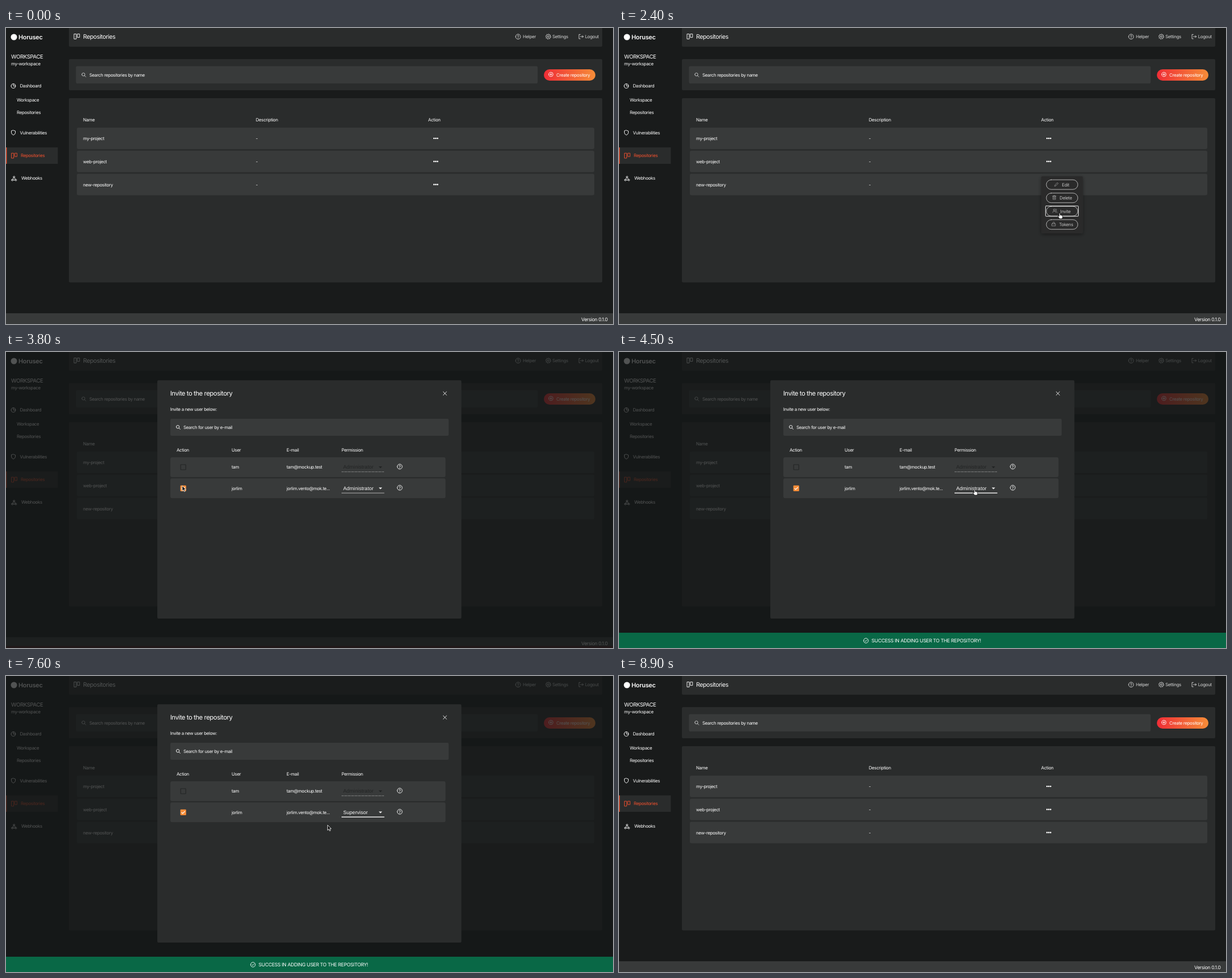
An HTML page that plays this animation: 1071 by 523 pixels, repeating every 9.4 s.

```html
<!DOCTYPE html>
<html lang="en">
<head>
<meta charset="utf-8">
<title>Invite a user to a repository</title>
<style>
html, body { margin: 0; width: 100%; height: 100%; overflow: hidden; background: #191b1b; }
svg { display: block; width: 1071px; height: 523px; }
text { font-family: Inter, Roboto, sans-serif; letter-spacing: -.04em; fill: #fff; text-rendering: geometricPrecision; }
text.select { font-family: "Liberation Sans", Arial, sans-serif; letter-spacing: .0094em; }
.line { fill: none; stroke: #fff; stroke-width: .9; stroke-linecap: round; stroke-linejoin: round; }
</style>
</head>
<body>
<svg id="stage" viewBox="0 0 1071 523">
  <defs>
    <linearGradient id="warm"><stop stop-color="#ef2d36"/><stop offset="1" stop-color="#f78d38"/></linearGradient>
    <filter id="shadow" x="-20%" y="-20%" width="140%" height="150%">
      <feDropShadow dx="0" dy="2" stdDeviation="3" flood-opacity=".4"/>
    </filter>
  </defs>
</svg>
<script>
const LOOP = 9400, STEP = 100;
const PAGE = '#191b1b', PANEL = '#2a2c2c', ROW = '#383a3a', ACCENT = '#f4522f', ORANGE = '#f78d38';
const BODY = 7.88;

const rect = (x, y, w, h, fill, r = 0, extra = '') =>
  `<rect x="${x}" y="${y}" width="${w}" height="${h}" rx="${r}" fill="${fill}" ${extra}/>`;
const text = (x, y, s, size = BODY, extra = '') =>
  `<text x="${x}" y="${y}" font-size="${size}" ${extra}>${s}</text>`;
const group = (id, content, extra = '') => `<g id="${id}" ${extra}>${content}</g>`;
const icon = (x, y, d, extra = '') =>
  `<path class="line" transform="translate(${x} ${y})" d="${d}" ${extra}/>`;
const ring = r => `M${-r} 0a${r} ${r} 0 1 1 ${2 * r} 0a${r} ${r} 0 1 1 ${-2 * r} 0`;
const ringAt = (x, y, r) => `M${x - r} ${y}a${r} ${r} 0 1 1 ${2 * r} 0a${r} ${r} 0 1 1 ${-2 * r} 0`;

const ICONS = {
  board: 'M-4.6 -4.4h3.6v8.8h-3.6zM1.2 -4.4h3.6v6h-3.6z',
  help: ring(4.4) + 'M-1.3 -1a1.35 1.35 0 1 1 2.1 1.1q-.8 .5 -.8 1.1M0 2.5v.1',
  exit: 'M-1.5 -3.8h-2.3v7.6h2.3M-1.3 0h5M2 -1.8l1.8 1.8l-1.8 1.8',
  pie: ring(3.9) + 'M0 -3.9v3.9h3.9',
  shield: 'M0 -4.2l3.5 1.2v3q0 2.7 -3.5 4.2q-3.5 -1.5 -3.5 -4.2v-3z',
  hook: ringAt(0, -2.7, 1.4) + ringAt(-3.1, 2.6, 1.4) + ringAt(3.1, 2.6, 1.4) +
    'M-.6 -1.4l-1.8 2.8M.6 -1.4l1.8 2.8M-1.6 2.6h3.2',
  search: ringAt(-.7, -.7, 2.7) + 'M1.3 1.3l2.3 2.3',
  add: ring(3.8) + 'M-1.8 0h3.6M0 -1.8v3.6',
  close: 'M-3 -3l6 6M3 -3l-6 6',
  done: ring(4.2) + 'M-1.9 .1l1.4 1.4l2.5 -2.8',
  pencil: 'M-3.2 3.2l.6 -2l4 -4l1.5 1.5l-4 4z',
  bin: 'M-3 -2.4h6M-1.2 -2.4v-1h2.4v1M-2.3 -2.4v5.8h4.6v-5.8M-.8 -.8v2.6M.8 -.8v2.6',
  people: ringAt(-1, -1.6, 1.6) + 'M-4 3q0 -2.3 3 -2.3t3 2.3M1.5 -3.2a1.6 1.6 0 0 1 0 3.2M2.7 1q1.5 .5 1.5 2',
  lock: 'M-3 -.6h6v3.8h-6zM-1.7 -.6v-1.2a1.7 1.7 0 0 1 3.4 0v1.2',
};

function gear() {
  const points = [];
  for (let i = 0; i < 32; i++) {
    const r = i % 4 < 2 ? 4.5 : 3.4, a = (i + .5) * Math.PI / 16;
    points.push(`${(r * Math.cos(a)).toFixed(2)} ${(r * Math.sin(a)).toFixed(2)}`);
  }
  return `M${points.join('L')}Z` + ring(1.5);
}

function sidebar() {
  return '<circle cx="14" cy="16" r="5.5" fill="#fff"/>' +
    text(22, 20, 'Horusec', 10.8, 'font-weight="600" style="letter-spacing:-.02em"') +
    text(9, 53.7, 'WORKSPACE', 9.6) + text(9, 66, 'my-workspace') +
    icon(13, 102.5, ICONS.pie) + text(24.5, 105.2, 'Dashboard') +
    text(19, 130.3, 'Workspace') + text(19, 151.5, 'Repositories') +
    icon(13, 185, ICONS.shield) + text(24.5, 187.8, 'Vulnerabilities') +
    rect(0, 211, 91.5, 29, PANEL) + rect(0, 211, 1.3, 29, ACCENT) +
    icon(14.6, 225.6, ICONS.board, `style="stroke:${ACCENT}" stroke-width="1"`) +
    text(26, 228.1, 'Repositories', BODY, `style="fill:${ACCENT}"`) +
    icon(14.2, 266, ICONS.hook) + text(27, 268.4, 'Webhooks');
}

function topBar() {
  const dim = 'opacity=".8"';
  return rect(111, -4, 941, 37, PANEL, 2) +
    icon(125, 15, ICONS.board) + text(136, 19, 'Repositories', 10.6) +
    icon(903.5, 15.3, ICONS.help, dim) + text(912, 18.2, 'Helper', BODY, dim) +
    icon(956.8, 15.2, gear(), dim) + text(964, 18.2, 'Settings', BODY, dim) +
    icon(1014.8, 15.2, ICONS.exit, dim) + text(1021.7, 18.2, 'Logout', BODY, dim);
}

function searchBar() {
  return rect(111, 55, 941, 55, PANEL, 2) + rect(123.5, 67.5, 814.5, 30.5, ROW, 2) +
    icon(137.2, 82.8, ICONS.search, 'opacity=".75"') + text(147, 85.7, 'Search repositories by name') +
    rect(949, 73, 91, 20, 'url(#warm)', 10) +
    icon(961.5, 82, ICONS.add) + text(971, 85.7, 'Create repository');
}

function repoTable() {
  const names = ['my-project', 'web-project', 'new-repository'];
  return rect(111, 124, 941, 325.5, PANEL, 2) +
    text(136, 165.3, 'Name') + text(440.7, 165.3, 'Description') + text(744.8, 165.3, 'Action') +
    names.map((name, i) => {
      const y = 176 + i * 40.8;
      return rect(125, y, 913, 38, ROW, 3) + text(136, y + 21.9, name) + text(440.7, y + 21.9, '-') +
        [755.2, 758.3, 761.4].map(x => `<circle cx="${x}" cy="${y + 19}" r="1.35" fill="#fff"/>`).join('');
    }).join('');
}

function actionMenu() {
  const items = [['Edit', 'pencil', 772, 781.5], ['Delete', 'bin', 768, 777.3],
    ['Invite', 'people', 769, 778.6], ['Tokens', 'lock', 767, 776.4]];
  return rect(745, 262, 73.5, 101, PANEL, 2, 'filter="url(#shadow)"') +
    items.map(([label, name, iconX, x], i) => {
      const y = 268.2 + i * 23.5;
      return `<rect class="line" x="754" y="${y}" width="55.5" height="17" rx="8.5" opacity=".7"/>` +
        icon(iconX, y + 7.8, ICONS[name], 'opacity=".45"') +
        text(x, y + 11.3, label, BODY, 'opacity=".7"');
    }).join('') +
    '<rect id="focusRing" class="line" x="752.6" y="314.4" width="58" height="18.3" rx="1"/>';
}

const caret = (y, fill) => `<path d="M657.7 ${y}h6l-3 3z" fill="${fill}"/>`;
const disabledSelect = y =>
  text(595, y + 6.2, 'Administrator', 8.92, 'class="select" style="fill:#222424"') + caret(y + 2.2, '#1f2121') +
  `<path d="M592 ${y + 11.7}h75.5" stroke="#fff" stroke-width=".6" stroke-dasharray=".6 .6"/>`;

function userRow(y, user, mail) {
  return rect(290, y, 485.5, 35, ROW, 3) + text(398, y + 20.2, user) + text(495, y + 20.2, mail) +
    icon(694.7, y + 16.5, ICONS.help);
}

function modal() {
  const box = (y, color) =>
    `<rect x="308.2" y="${y}" width="9" height="9" rx=".5" fill="none" stroke="${color}" stroke-width="1.1"/>`;
  return rect(0, 0, 1071, 523, '#151717', 0, 'opacity=".74"') + rect(0, 519.5, 1071, 3.5, '#211819') +
    rect(267, 50, 536.5, 421, PANEL, 2) +
    text(289.7, 77, 'Invite to the repository', 11.4) + icon(774.4, 73.2, ICONS.close) +
    text(289.7, 104.4, 'Invite a new user below:') +
    rect(290, 118, 491, 30, ROW, 2) + icon(303.8, 133, ICONS.search) +
    text(313, 135.7, 'Search for user by e-mail') +
    [[301, 'Action'], [398, 'User'], [495, 'E-mail'], [592, 'Permission']]
      .map(([x, label]) => text(x, 175.5, label)).join('') +
    userRow(186, 'tam', 'tam@mockup.test') + userRow(223.3, 'jorlim', 'jorlim.vento@mok.te...') +
    box(199, '#232525') + disabledSelect(200) +
    group('unchecked', box(236.3, '#fff') + disabledSelect(237.4)) +
    group('checked', rect(307.6, 235.8, 10.2, 10.2, ORANGE, 1.2) +
      '<path d="M309.8 241l2 2l4 -4.2" fill="none" stroke="#fff" stroke-width="1.2"/>' +
      text(595, 243.6, 'Administrator', 8.92, 'id="role" class="select"') + caret(239.6, '#fff') +
      rect(592, 248.8, 75.5, .6, '#fff') + '<rect id="underline" y="248.6" height="1.1" fill="#fff"/>') +
    group('roleMenu', rect(592, 226, 76, 69, ROW, 2, 'filter="url(#shadow)"') +
      rect(592, 230.6, 76, 20, '#000', 0, 'opacity=".08"') +
      ['Administrator', 'Supervisor', 'Member']
        .map((role, i) => text(600.9, 243.8 + i * 20, role, 8.92, 'class="select"')).join(''));
}

function cursors() {
  const style = 'fill="#fff" stroke="#111" stroke-width=".8" stroke-linejoin="round"';
  return group('arrow', `<path d="M.4 .4v9.2l2.1 -2l1.5 3.2l1.6 -.7l-1.5 -3.2h2.9z" fill="#111" stroke="#fff" stroke-width=".8"/>`) +
    group('hand', `<path d="M-.9 6V1q0 -.9 .9 -.9t.9 .9v2.6q.9 -.5 1.5 .3q.9 -.4 1.4 .4q1.4 -.3 1.4 1v2q0 1 -.7 2v.7h-4.8q-.4 -1.6 -2.9 -4q0 -1.3 1.3 -.8z" ${style}/>`);
}

const stage = document.getElementById('stage');
stage.innerHTML += sidebar() + topBar() + searchBar() + repoTable() +
  rect(0, 504, 1071, 19, ROW) + text(1015, 518.2, 'Version 0.1.0', 8.6) +
  group('actionMenu', actionMenu()) + group('modal', modal()) +
  group('toast', rect(0, 496, 1071, 27, '#096846') + icon(435.7, 510, ICONS.done) +
    text(445.6, 513.2, 'SUCCESS IN ADDING USER TO THE REPOSITORY!', 8.7)) +
  cursors();

const el = id => document.getElementById(id);
const show = (id, on) => el(id).setAttribute('visibility', on ? 'visible' : 'hidden');
const fade = (id, value) => { el(id).setAttribute('opacity', value); show(id, value > 0); };
const ramp = (t, from, to) => Math.min(1, Math.max(0, (t - from) / (to - from)));
const ease = p => p * p * (3 - 2 * p);

// Pointer stops: time, x, y.
const PATH = [[400, 514, 78], [500, 514, 78], [800, 775, 257], [900, 775, 257], [1200, 766.5, 273],
  [1400, 766.5, 273], [2000, 776, 322], [2100, 776, 322], [2300, 777.5, 327], [2400, 777.5, 327],
  [2800, 369, 226], [2900, 369, 226], [3100, 323.5, 233.5], [3200, 323.5, 233.5], [3400, 310.5, 236],
  [3800, 310.5, 236], [4400, 627.5, 243], [4700, 627.5, 243], [5200, 638.5, 277], [5500, 638.5, 277],
  [5800, 629.5, 263], [7500, 629.5, 263], [7600, 567, 263], [7700, 567, 263], [8400, 774, 75], [LOOP, 774, 75]];

function pointerAt(t) {
  const i = Math.max(1, PATH.findIndex(stop => stop[0] >= t));
  const [t0, x0, y0] = PATH[i - 1], [t1, x1, y1] = PATH[i];
  const p = ease(ramp(t, t0, t1));
  return [x0 + (x1 - x0) * p, y0 + (y1 - y0) * p];
}

const HAND_SPANS = [[1200, 2500], [3100, 3800], [4400, 6300]];

function draw(t) {
  const [x, y] = pointerAt(t);
  const visible = t >= 400 && t < 8900;
  const hand = HAND_SPANS.some(([a, b]) => t >= a && t < b);
  show('arrow', visible && !hand);
  show('hand', visible && hand);
  for (const id of ['arrow', 'hand']) el(id).setAttribute('transform', `translate(${x} ${y})`);

  fade('actionMenu', ramp(t, 1300, 1500) * (1 - ramp(t, 2400, 2600)));
  show('focusRing', t >= 2300 && t < 2600);

  fade('modal', ramp(t, 2400, 2600) * (1 - ramp(t, 8500, 8800)));
  const open = t >= 2500 && t < 8800, checked = t >= 3700;
  show('unchecked', open && !checked);
  show('checked', open && checked);
  fade('roleMenu', open ? ramp(t, 4500, 4700) * (1 - ramp(t, 6000, 6300)) : 0);
  el('role').textContent = t < 6100 ? 'Administrator' : 'Supervisor';

  const width = 75.5 * ramp(t, 4300, 4500) * (t < 8400 ? 1 : t < 8500 ? .5 : t < 8600 ? .11 : 0);
  el('underline').setAttribute('x', 629.75 - width / 2);
  el('underline').setAttribute('width', width);

  const rise = ease(ramp(t, 3800, 4100)) * (1 - ease(ramp(t, 8000, 8300)));
  show('toast', rise > 0);
  el('toast').setAttribute('transform', `translate(0 ${27 * (1 - rise)})`);
}

const start = performance.now();
function tick() {
  const t = (performance.now() - start) % LOOP;
  draw(Math.floor(t / STEP) * STEP);
  requestAnimationFrame(tick);
}
tick();
</script>
</body>
</html>
```
